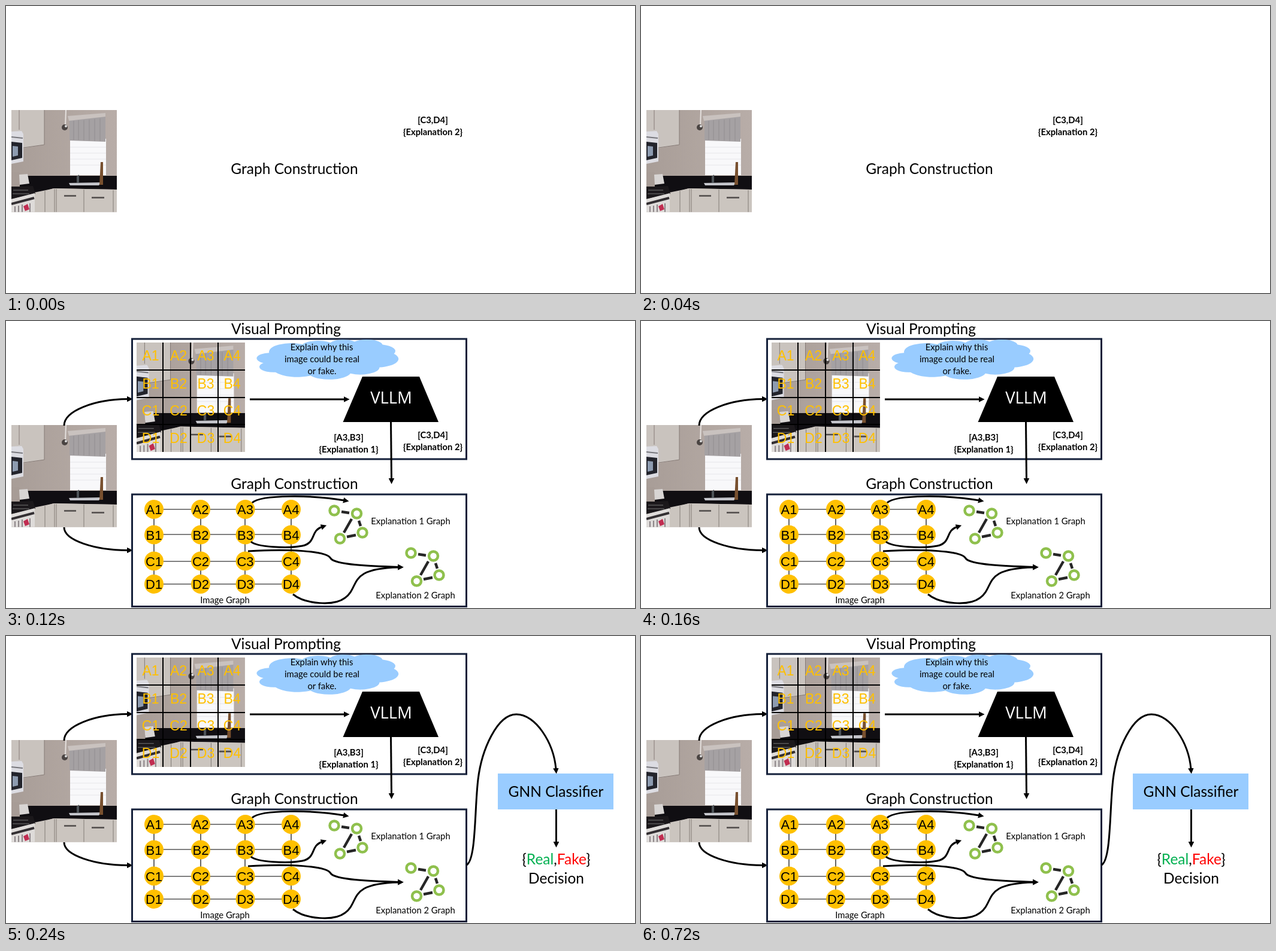
These frames come from a looping animation (1050x480 px, 1.04 s). An HTML page:

```html
<!DOCTYPE html>
<html lang="en">
<head>
<meta charset="utf-8">
<title>Visual prompting and graph construction</title>
<style>
  html, body { margin: 0; width: 100%; height: 100%; overflow: hidden; background: #fff; }
  svg { display: block; width: 100vw; height: 100vh; }
  text { font-family: Lato, "Open Sans", sans-serif; text-anchor: middle; }
  .big { font-size: 24.5px; }
  .small { font-size: 14.8px; }
  .bold { font-size: 14.8px; font-weight: 700; }
  .cell, .node { font-family: "Liberation Sans", Arial, sans-serif; }
  .cell { font-size: 23px; fill: #ffc000; }
  .node { font-size: 22px; }
  .model { font: 27.5px "Open Sans", sans-serif; fill: #fff; }
  .arrow { fill: none; stroke: #000; stroke-width: 3; marker-end: url(#head); }
  .box { fill: none; stroke: #14203a; stroke-width: 3; }
</style>
</head>
<body>
<svg viewBox="0 0 1050 480" preserveAspectRatio="none">
  <defs>
    <marker id="head" viewBox="0 0 10 10" refX="1" refY="5" markerWidth="3.2" markerHeight="3.2" orient="auto">
      <path d="M0 0L10 5L0 10Z"/>
    </marker>
    <linearGradient id="wall">
      <stop offset="0" stop-color="#a89d97"/>
      <stop offset="1" stop-color="#b8ada8"/>
    </linearGradient>
    <clipPath id="crop"><rect width="176" height="170.5"/></clipPath>
    <g id="kitchen" clip-path="url(#crop)">
      <rect width="176" height="171" fill="url(#wall)"/>
      <path d="M0 0H55V58L13 65L0 62Z" fill="#c9c3be"/>
      <path d="M13 0V33M55 0V58L20 63" fill="none" stroke="#857b76"/>
      <path d="M0 36L17 35L20 40V86L0 90Z" fill="#dcdce2"/>
      <path d="M0 53L18 55V80L0 84Z" fill="#23242c"/>
      <path d="M2 60L11 61V76L2 78Z" fill="#8d9bb0"/>
      <path d="M0 45L19 47" stroke="#77777c" stroke-width="2"/>
      <rect x="98" y="48" width="60" height="61" fill="#f8f8fa"/>
      <path d="M98 62h60M98 72h60M98 82h60M98 92h60" stroke="#e6e6ea"/>
      <path d="M97 17L157 11V53L97 51Z" fill="#a5a1a3"/>
      <path d="M104 18V50M112 17V50M121 17V51M130 16V51M139 15V52M148 14V52" stroke="#918d90"/>
      <path d="M94 10L157 5V11L96 18Z" fill="#c9c2bf"/>
      <path d="M91 0L90 28" stroke="#e4e0dd" stroke-width="2"/>
      <circle cx="89" cy="29" r="5" fill="#4a4442"/>
      <circle cx="91" cy="27" r="2" fill="#ddd"/>
      <path d="M0 110H176V133L70 131L40 140H0Z" fill="#100e12"/>
      <path d="M0 104H14V128H0Z" fill="#a79c96"/>
      <path d="M13 108L27 107L30 123L14 125Z" fill="#d8d5d4"/>
      <path d="M96 122L150 121L146 126H98Z" fill="#c4c5cb"/>
      <path d="M109 122V111L113 108V122Z" fill="#4d5358"/>
      <path d="M149 87H153V125H147Z" fill="#78502f"/>
      <path d="M38 138L72 131L176 133V171H38Z" fill="#cbc5bf"/>
      <path d="M56 135V171M72 132V171M75 132V171M121 133V171M170 134V171" stroke="#817a75"/>
      <path d="M88 143.5H108M134 146.5H155" stroke="#4f4b4a" stroke-width="2.5"/>
      <path d="M0 129L36 127L40 140L0 149Z" fill="#1b181b"/>
      <path d="M3 134H28M2 140H30" stroke="#777"/>
      <path d="M0 149L39 139V171H0Z" fill="#dedbd9"/>
      <path d="M0 157L38 147" stroke="#332f32" stroke-width="4"/>
      <path d="M6 161V171M12 160V171M18 158V171M31 156V171" stroke="#8c8588" stroke-width="2"/>
      <path d="M20 161L27 157L30 166L23 169Z" fill="#c12d51"/>
    </g>
    <g id="cluster">
      <path d="M560 319L573 321M577 331L564 354M589 334L592 343M569 361L584 358" stroke="#262626" stroke-width="4.5"/>
      <g fill="#fff" stroke="#8fc04d" stroke-width="4.5">
        <circle cx="548" cy="317" r="7.5"/><circle cx="585.5" cy="322" r="7.5"/>
        <circle cx="595" cy="354" r="7.5"/><circle cx="557.5" cy="364" r="7.5"/>
      </g>
    </g>
  </defs>

  <use href="#kitchen" x="9" y="174"/>
  <text class="big" x="481.5" y="281">Graph Construction</text>
  <text class="bold" x="712.5" y="196">[C3,D4]</text>
  <text class="bold" x="712.5" y="216">{Explanation 2}</text>

  <g data-from="60">
    <path class="arrow" d="M97 175C97 150 148 131 203 130.5"/>
    <path class="arrow" d="M97 345C97 367 148 383 203 383.5"/>
  </g>

  <g data-from="120">
    <text class="big" x="467.5" y="22">Visual Prompting</text>
    <rect class="box" x="210.5" y="30" width="558" height="201"/>
    <use href="#kitchen" transform="translate(218 36) scale(1.028 1.073)"/>
    <path d="M262 36V219M308 36V219M354 36V219M218 82H399M218 128H399M218 173H399" stroke="#000" stroke-width="2"/>
    <g id="cells"></g>
    <path class="arrow" d="M407 131H565"/>
    <path transform="translate(418 31) scale(.01102 .0031)" fill="#99ccff" d="M1930 7160
      A3376 4595 0 0 1 6970 2600 A2667 3633 0 0 1 11210 1700 A2182 2972 0 0 1 14870 1160
      A2428 3297 0 0 1 19110 2710 A2667 3636 0 0 1 20830 7660 A3387 4610 0 0 1 18650 15010
      A2892 3933 0 0 1 14240 18310 A3376 4607 0 0 1 8210 19510 A3860 5271 0 0 1 2900 17640
      A2180 2959 0 0 1 1070 12640 A2172 2972 0 0 1 1930 7160Z"/>
    <text class="small" x="527" y="49">Explain why this</text>
    <text class="small" x="527.5" y="69">image could be real</text>
    <text class="small" x="527.5" y="89">or fake.</text>
    <path d="M595 93H690L722 169H562.5Z"/>
    <text class="model" x="643" y="138">VLLM</text>
    <path class="arrow" d="M642.5 168L643.5 264"/>
    <text class="bold" x="572" y="200">[A3,B3]</text>
    <text class="bold" x="572" y="220">{Explanation 1}</text>

    <rect class="box" x="210.5" y="290" width="558" height="187.5"/>
    <path d="M247 315H476M247 357H476M247 402H476M247 440H476M247 315V440M325 315V440M399 315V440M476 315V440" fill="none" stroke="#000" stroke-width="1.2"/>
    <g id="nodes"></g>
    <text class="small" x="365.5" y="472">Image Graph</text>
    <path class="arrow" d="M411 304C425 290 515 291 564 300"/>
    <path class="arrow" d="M409 369C418 378 470 381 495 376C518 371 508 351 527 344.5"/>
    <path class="arrow" d="M404 385C470 381 535 384 542 397C550 408 610 410 655 411.5"/>
    <path class="arrow" d="M479 457C500 474 548 477 566 463C592 444 568 414 655 412"/>
    <use href="#cluster"/>
    <use href="#cluster" x="128" y="71"/>
    <text class="small" x="675.5" y="340">Explanation 1 Graph</text>
    <text class="small" x="683.5" y="464">Explanation 2 Graph</text>
  </g>

  <g data-from="180">
    <path class="arrow" d="M769 383C785 373 782 290 788 240C794 190 820 131 852 131C884 131 914 178 918 222"/>
    <rect x="821" y="230" width="193" height="60" fill="#99ccff"/>
    <text class="big" x="918" y="269">GNN Classifier</text>
  </g>

  <g data-from="240">
    <path class="arrow" d="M918.5 290V345"/>
    <text class="big" x="918.5" y="382">{<tspan fill="#00b050">Real</tspan>,<tspan fill="#ff0000">Fake</tspan>}</text>
    <text class="big" x="918.5" y="414">Decision</text>
  </g>
</svg>
<script>
const LOOP = 1040;
const NS = "http://www.w3.org/2000/svg";

function add(parent, tag, attrs, text = "") {
  const el = document.createElementNS(NS, tag);
  for (const key in attrs) el.setAttribute(key, attrs[key]);
  el.textContent = text;
  parent.append(el);
}

// Calls draw(x, y, label) for each field of the A1..D4 grid.
function eachField(xs, ys, draw) {
  ys.forEach((y, r) => xs.forEach((x, c) => draw(x, y, "ABCD"[r] + (c + 1))));
}

const cells = document.getElementById("cells");
eachField([241.5, 288, 333.5, 377.5], [66, 113, 158, 204], (x, y, label) =>
  add(cells, "text", { class: "cell", x, y }, label));

const nodes = document.getElementById("nodes");
eachField([247, 325, 399.5, 476], [315, 357.5, 401.5, 440], (x, y, label) => {
  add(nodes, "circle", { cx: x, cy: y, r: 16, fill: "#ffc000" });
  add(nodes, "text", { class: "node", x, y: y + 8 }, label);
});

const steps = [...document.querySelectorAll("[data-from]")];

function render(time) {
  for (const step of steps) {
    step.style.display = time >= +step.dataset.from ? "" : "none";
  }
}

const start = performance.now();
function tick() {
  render((performance.now() - start) % LOOP);
  requestAnimationFrame(tick);
}
render(0);
requestAnimationFrame(tick);
</script>
</body>
</html>
```
